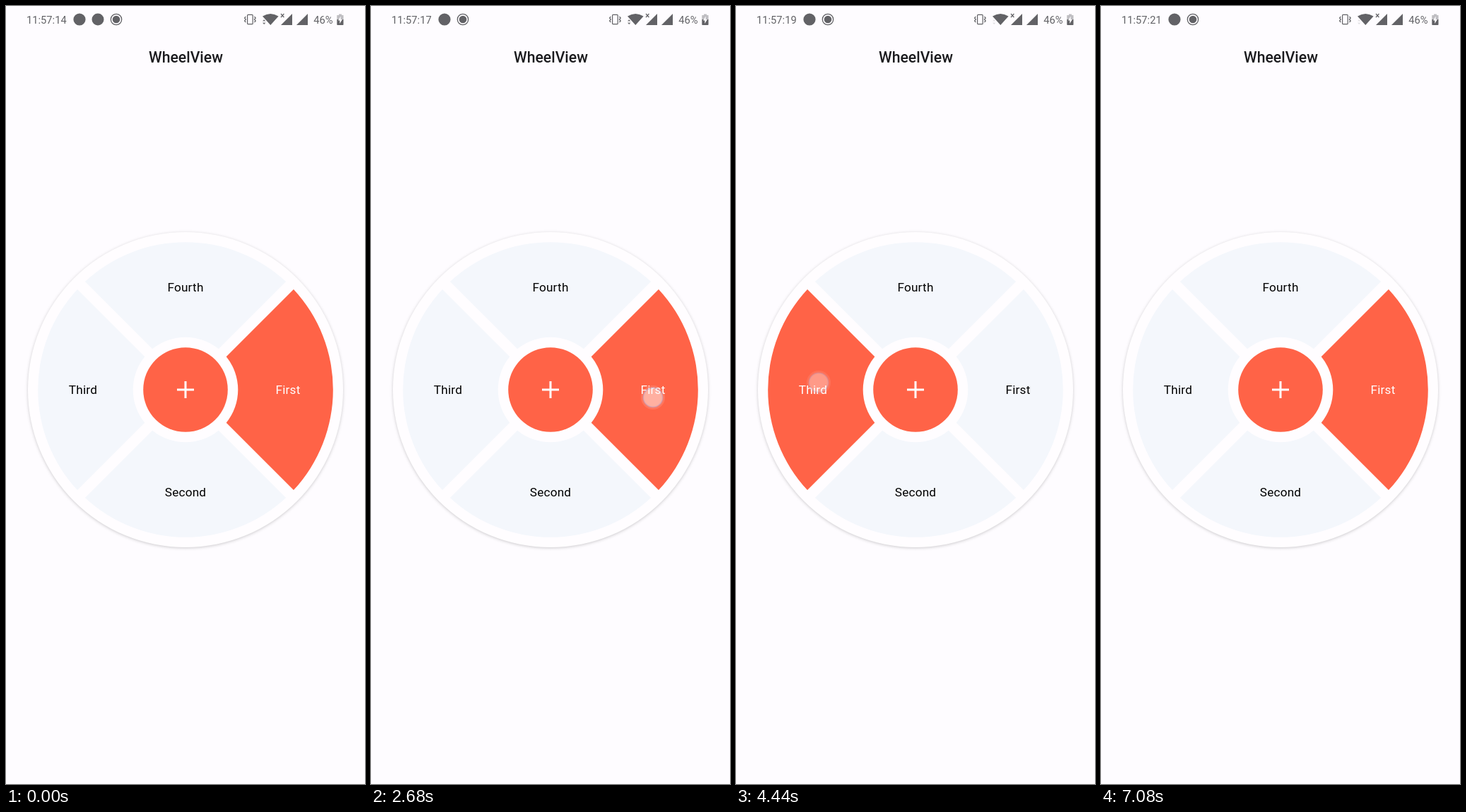
Recreate the animation shown at these times as an HTML page. Size 508x1101 px, loop 7.16 s.

```html
<!DOCTYPE html>
<html lang="en">
<head>
<meta charset="utf-8">
<title>WheelView</title>
<style>
  html, body { margin: 0; width: 100%; height: 100%; overflow: hidden; background: #fefcff; }
  svg { display: block; width: 100vw; height: 100vh; font-family: Roboto, "Noto Sans", sans-serif; }
  .status { fill: #626266; }
  .line { fill: none; stroke: #626266; }
  .small { font-size: 14.7px; }
  .title { font-size: 21.2px; font-weight: 500; fill: #1a1a1d; text-anchor: middle; }
  .label { font-size: 17.2px; letter-spacing: .2px; text-anchor: middle; }
  .disc { fill: #fffdff; filter: drop-shadow(0 1px 2px rgba(0, 0, 0, .2)); }
</style>
</head>
<body>
<svg viewBox="0 0 508 1101">
  <g class="status">
    <text id="clock" class="small" x="29" y="24.6"></text>
    <circle cx="104" cy="19" r="8.6"/>
    <circle id="app" cy="19" r="8.5"/>
    <g id="record">
      <circle class="line" cy="19" r="7.7" stroke-width="1.3"/>
      <circle cy="19" r="5.3"/>
    </g>

    <g class="line" stroke-width="1.2">
      <rect x="341.6" y="12.3" width="7.6" height="13.4" rx="1"/>
      <path d="M339.3 15l-1.7 2 1.7 2-1.7 2 1.7 2M351.5 15l1.7 2-1.7 2 1.7 2-1.7 2"/>
    </g>
    <path d="M363 14.6Q374.3 7.4 385.6 14.6L374.3 27Z"/>
    <path id="traffic" d="M362.8 21.6l2.4-2.6 2.4 2.6zM362.8 23.6l2.4 2.6 2.4-2.6z" stroke="#fefcff" stroke-width=".4"/>
    <path class="line" d="M389 11l4.4 5M393.4 11l-4.4 5" stroke-width="1.2"/>
    <path d="M405 11V27H389ZM427 11V27H411Z"/>
    <text class="small" x="435.2" y="24.6">46%</text>
    <path d="M471 11.5h4v1.6h2.5v6h-9.2v-6h2.7z" opacity=".4"/>
    <path d="M468.3 19h9.2v7.2q0 .8-.8.8h-7.6q-.8 0-.8-.8z"/>
    <path d="M473.6 14.5l-3.6 6h2.3v4.6l3.6-6h-2.3z" fill="#fefcff"/>
  </g>

  <text class="title" x="254.5" y="80">WheelView</text>

  <circle class="disc" cx="254" cy="543" r="223"/>
  <g id="wheel"></g>
  <circle cx="254" cy="543" r="59.8" fill="#ff6347"/>
  <path d="M242 543h24M254 531v24" stroke="#fff" stroke-width="3"/>

  <g id="dot">
    <circle r="17" fill="#fff" opacity=".16"/>
    <circle r="13.6" fill="#fff" fill-opacity=".57" stroke="#b9b4dc" stroke-opacity=".65" stroke-width="1.7"/>
  </g>
</svg>
<script>
const LOOP = 7160, STEP = 40, FADE = 180;
const CX = 254, CY = 543, OUTER = 208.8, INNER = 74.3, HALF_GAP = 7.7, LABEL_R = 145;
const NAMES = ['First', 'Second', 'Third', 'Fourth'];
const TICKS = [400, 1360, 2400, 3400, 4400, 5400, 6400];
// x, y, press time, release time, selected sector
const TAPS = [
  [120, 545, 1000, 1120, 2],
  [399, 554, 2520, 2640, 0],
  [258, 408, 3240, 3320, 3],
  [117, 533, 4240, 4360, 2],
  [400, 559, 5240, 5320, 0],
  [479, 200, 6640, 6720, 0]
];

const $ = id => document.getElementById(id);
const clamp = v => Math.min(1, Math.max(0, v));
const smooth = v => v * v * (3 - 2 * v);
const point = (r, a) => `${(CX + r * Math.cos(a)).toFixed(2)} ${(CY + r * Math.sin(a)).toFixed(2)}`;

function add(tag, attrs) {
  const el = document.createElementNS('http://www.w3.org/2000/svg', tag);
  for (const key in attrs) el.setAttribute(key, attrs[key]);
  return $('wheel').appendChild(el);
}

// Sector edges run parallel to the diagonals, so the gaps keep one width.
function sectorPath(mid) {
  const a = Math.PI / 4 - Math.asin(HALF_GAP / OUTER);
  const b = Math.PI / 4 - Math.asin(HALF_GAP / INNER);
  return `M${point(OUTER, mid - a)}A${OUTER} ${OUTER} 0 0 1 ${point(OUTER, mid + a)}` +
    `L${point(INNER, mid + b)}A${INNER} ${INNER} 0 0 0 ${point(INNER, mid - b)}Z`;
}

const sectors = NAMES.map((name, i) => {
  const mid = i * Math.PI / 2;
  const shape = add('path', { d: sectorPath(mid) });
  const label = add('text', {
    class: 'label',
    x: CX + LABEL_R * Math.cos(mid),
    y: CY + 6 + LABEL_R * Math.sin(mid)
  });
  label.textContent = name;
  return { shape, label };
});

function drawIcons(t) {
  const shift = 26 * smooth(clamp((t - 40) / 440));
  const gone = clamp((t - 2400) / 160);
  $('app').setAttribute('cx', 130 + shift);
  $('app').setAttribute('opacity', 1 - gone);
  $('record').setAttribute('transform', `translate(${156 - shift} 0)`);
  $('traffic').setAttribute('opacity', t < 3080 ? 1 : .2);
  $('clock').textContent = '11:57:' + (14 + TICKS.filter(tick => t >= tick).length);
}

function drawWheel(t) {
  const selected = TAPS.reduce((now, tap) => t >= tap[3] ? tap[4] : now, 0);
  sectors.forEach(({ shape, label }, i) => {
    const on = i === selected;
    shape.setAttribute('fill', on ? '#ff6347' : '#f4f7fc');
    label.setAttribute('fill', on ? '#fff' : '#000');
  });
}

function drawDot(t) {
  const tap = TAPS.find(([, , down, up]) => t >= down && t < up + FADE);
  $('dot').setAttribute('opacity', tap ? 1 - clamp((t - tap[3]) / FADE) : 0);
  if (tap) $('dot').setAttribute('transform', `translate(${tap[0]} ${tap[1]})`);
}

function frame() {
  const t = Math.floor(performance.now() % LOOP / STEP) * STEP;
  drawIcons(t);
  drawWheel(t);
  drawDot(t);
  requestAnimationFrame(frame);
}
frame();
</script>
</body>
</html>
```
